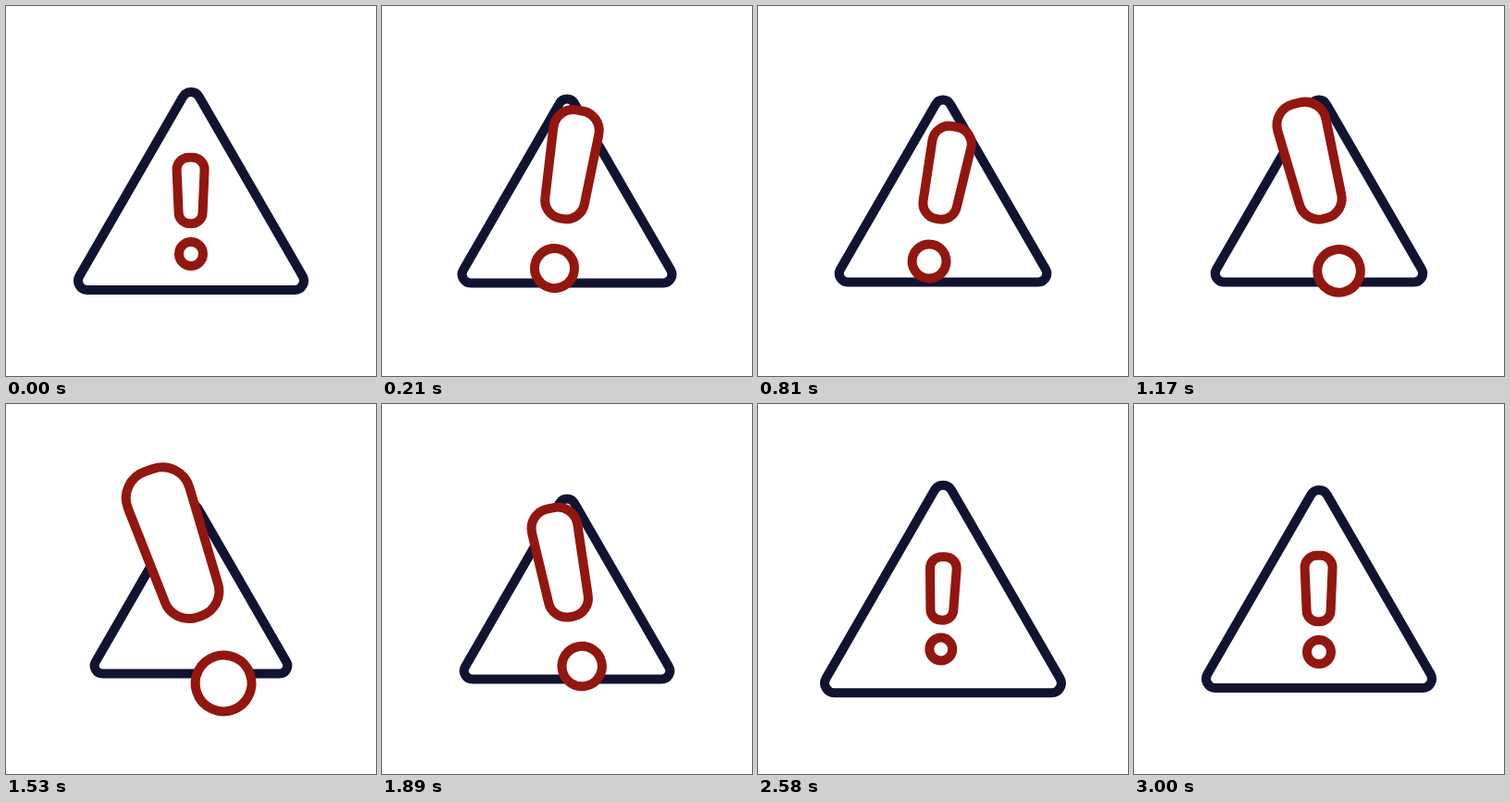
Animation, 400 px wide and 400 px high, one loop 5530 ms. Source, as an HTML page:

```html
<!DOCTYPE html>
<html lang="en">
<head>
<meta charset="utf-8">
<title>Warning sign</title>
<style>
  html, body { margin: 0; width: 100%; height: 100%; overflow: hidden; background: #fff; }
  svg { display: block; width: 100%; height: 100%; }
  g { fill: #fff; }
  #sign { stroke: #121331; }
  #mark { stroke: #911710; }
</style>
</head>
<body>
<svg viewBox="0 0 400 400">
  <g id="sign">
    <path d="M208.66 98 L320.66 292 A10 10 0 0 1 312 307 H88 A10 10 0 0 1 79.34 292 L191.34 98 A10 10 0 0 1 208.66 98 Z"/>
  </g>
  <g id="mark">
    <path d="M197.6 163.7 h4 a13 13 0 0 1 13 13.5 l-2 46 a12 12 0 0 1 -12 12 h-2 a12 12 0 0 1 -12 -12 l-2 -46 a13 13 0 0 1 13 -13.5 Z"/>
    <circle cx="200" cy="268" r="13"/>
  </g>
</svg>
<script>
const LOOP = 5530, STEP = 30, STROKE = 10;
const RIGHT = 430, LANDED = 2150, REST = 2900;

const sign = document.getElementById('sign');
const mark = document.getElementById('mark');

// Eased progress from 0 to 1 between two moments.
function ramp(time, from, to) {
  const u = Math.min(Math.max((time - from) / (to - from), 0), 1);
  return u * u * (3 - 2 * u);
}

// The stroke keeps its width whatever the scale.
function pose(group, scale, lift = 0, tilt = 0) {
  group.setAttribute('transform',
    `translate(200 200) rotate(${tilt}) translate(0 ${-lift}) scale(${scale}) translate(-200 -200)`);
  group.setAttribute('stroke-width', STROKE / scale);
}

// Swing right, swing left, overshoot, settle.
function draw() {
  const elapsed = (performance.now() - start) % LOOP;
  const time = Math.floor(elapsed / STEP) * STEP;
  const lean = ramp(time, 0, RIGHT);
  const settle = ramp(time, LANDED, REST);

  const signScale = 1 - 0.145 * lean
    + 0.088 * (ramp(time, RIGHT, 1000) - ramp(time, 1000, 1500))
    + 0.268 * ramp(time, 1780, LANDED) - 0.123 * settle;

  const markScale = 1 + 1.36 * lean
    - 1.1 * ramp(time, RIGHT, 930) + 1.08 * ramp(time, 930, 1415)
    - 1.45 * ramp(time, 1655, LANDED) + 0.11 * settle;

  const tilt = 19 * lean - 38 * ramp(time, 590, 1340)
    + 24 * ramp(time, 1725, LANDED) - 5 * settle;

  const lift = 40 * Math.max(0, markScale - 1) ** 0.85;

  pose(sign, signScale);
  pose(mark, markScale, lift, tilt);
  requestAnimationFrame(draw);
}

const start = performance.now();
draw();
</script>
</body>
</html>
```
